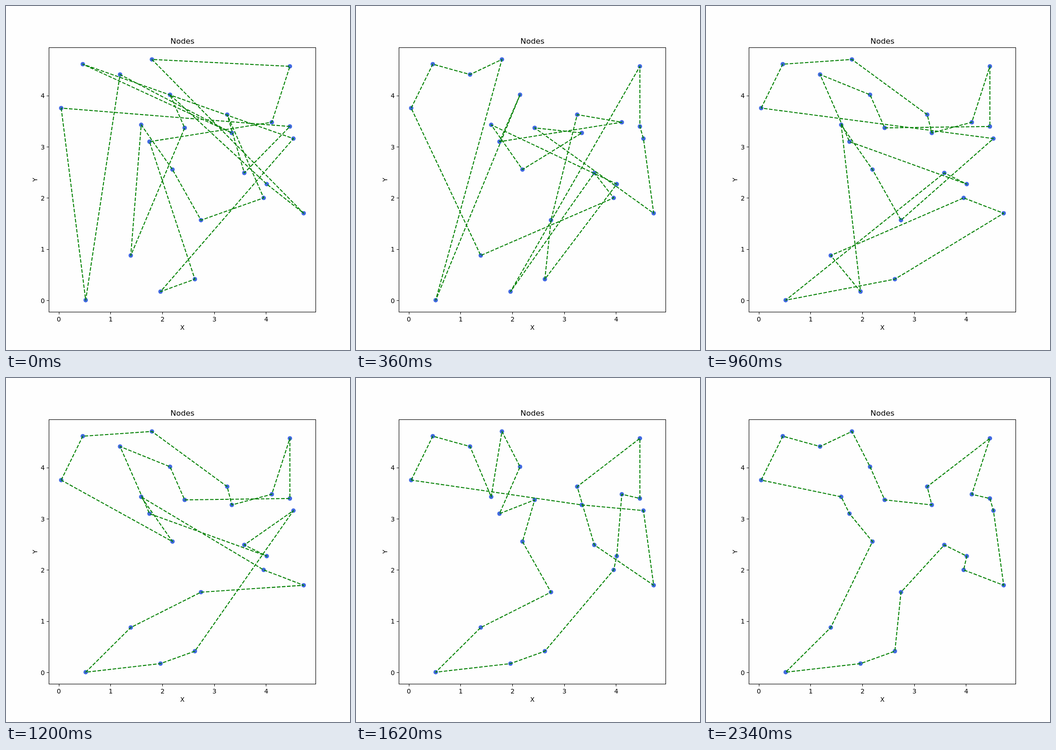
An HTML page that plays this animation: 748 by 748 pixels, repeating every 2400 ms.

```html
<!DOCTYPE html>
<html lang="en">
<head>
<meta charset="utf-8">
<title>Nodes</title>
<style>
html, body { margin: 0; width: 100%; height: 100%; overflow: hidden; background: #fefefe; }
svg { display: block; width: 100vw; height: 100vh; }
text { font: 13.89px "DejaVu Sans", sans-serif; fill: #000; text-anchor: middle; }
#title { font-size: 16.67px; }
.axis { fill: none; stroke: #000; stroke-width: 1.11; }
#dots { fill: #4169e1; }
#tour { fill: none; stroke: #008000; stroke-width: 2.08; stroke-dasharray: 7.71 3.33; stroke-linejoin: round; }
</style>
</head>
<body>
<svg viewBox="0 0 748 748">
  <g id="dots"></g>
  <path id="tour"/>
  <rect class="axis" x="93.5" y="90.5" width="580" height="575"/>
  <path id="ticks" class="axis"/>
  <g id="labels"></g>
  <text id="title" x="383.7" y="82">Nodes</text>
  <text x="383.5" y="704">X</text>
  <text transform="translate(67.5 377.7) rotate(-90)">Y</text>
</svg>
<script>
const LOOP = 2400, STEP = 60;
const $ = id => document.getElementById(id);

// Nodes A to X
const nodes = [
  [120, 222], [167, 126.5], [248, 149], [317.3, 116.2], [356.7, 193], [388.5, 265],
  [294, 258.4], [312, 295], [362, 355.7], [271.3, 542.5], [173.3, 639.7], [336, 621],
  [410.7, 594], [424, 465.7], [481, 236.2], [491, 276], [518.2, 363], [567, 387.3],
  [560.3, 417.3], [647.3, 450.7], [578, 252.8], [617.3, 262], [625, 288.3], [617.3, 131.2]
];

// Visiting orders at given steps; the search moves between them
const stages = [
  [0, "AKCPBWLMHUXDTREFJGINSOQV"],
  [6, "ABCDKEHUONMRGIPFTWVXLQSJ"],
  [11, "AJLUDGBCEFOINWRXPHKMTSVQ"],
  [20, "ABDOPUXVFECHRQWMLKJNTSGI"],
  [27, "ABCGDEHFINJKLMSRUVXOQTWP"],
  [32, "BACDEFRTSQPOXVWUNMLJKIHG"],
  [39, "ABCDEFPOXUVWTSRQNMLKJIHG"]
];

// Segment reversals that lead from one order to the next
function reversals(from, to) {
  const steps = [from];
  let cur = [...from];
  [...to].forEach((node, i) => {
    const j = cur.indexOf(node);
    if (j === i) return;
    cur = [...cur.slice(0, i), ...cur.slice(i, j + 1).reverse(), ...cur.slice(j + 1)];
    steps.push(cur.join(""));
  });
  return steps;
}

const tours = [];
for (let s = 0; s + 1 < stages.length; s++) {
  const [start, from] = stages[s], [end, to] = stages[s + 1];
  const steps = reversals(from, to);
  for (let k = start; k <= end; k++) {
    tours[k] = steps[Math.round((k - start) / (end - start) * (steps.length - 1))];
  }
}

function pathOf(order) {
  return "M" + [...order, order[0]].map(c => nodes[c.charCodeAt(0) - 65].join(" ")).join("L");
}

$("dots").innerHTML = nodes.map(([x, y]) => `<circle cx="${x}" cy="${y}" r="4.8"/>`).join("");

let ticks = "", labels = "";
for (let n = 0; n < 5; n++) {
  const x = 115 + 112.7 * n, y = 640.4 - 111.35 * n;
  const px = Math.floor(x) + 0.5, py = Math.floor(y) + 0.5;
  ticks += `M${px} 665.5v5M93.5 ${py}h-5`;
  labels += `<text x="${x}" y="686">${n}</text><text x="80" y="${y + 5.2}">${n}</text>`;
}
$("ticks").setAttribute("d", ticks);
$("labels").innerHTML = labels;

let shown = -1;
function draw(now) {
  const step = Math.floor((now % LOOP) / STEP);
  if (step !== shown) {
    $("tour").setAttribute("d", pathOf(tours[step]));
    shown = step;
  }
}

function tick() {
  draw(performance.now());
  requestAnimationFrame(tick);
}
tick();
</script>
</body>
</html>
```
